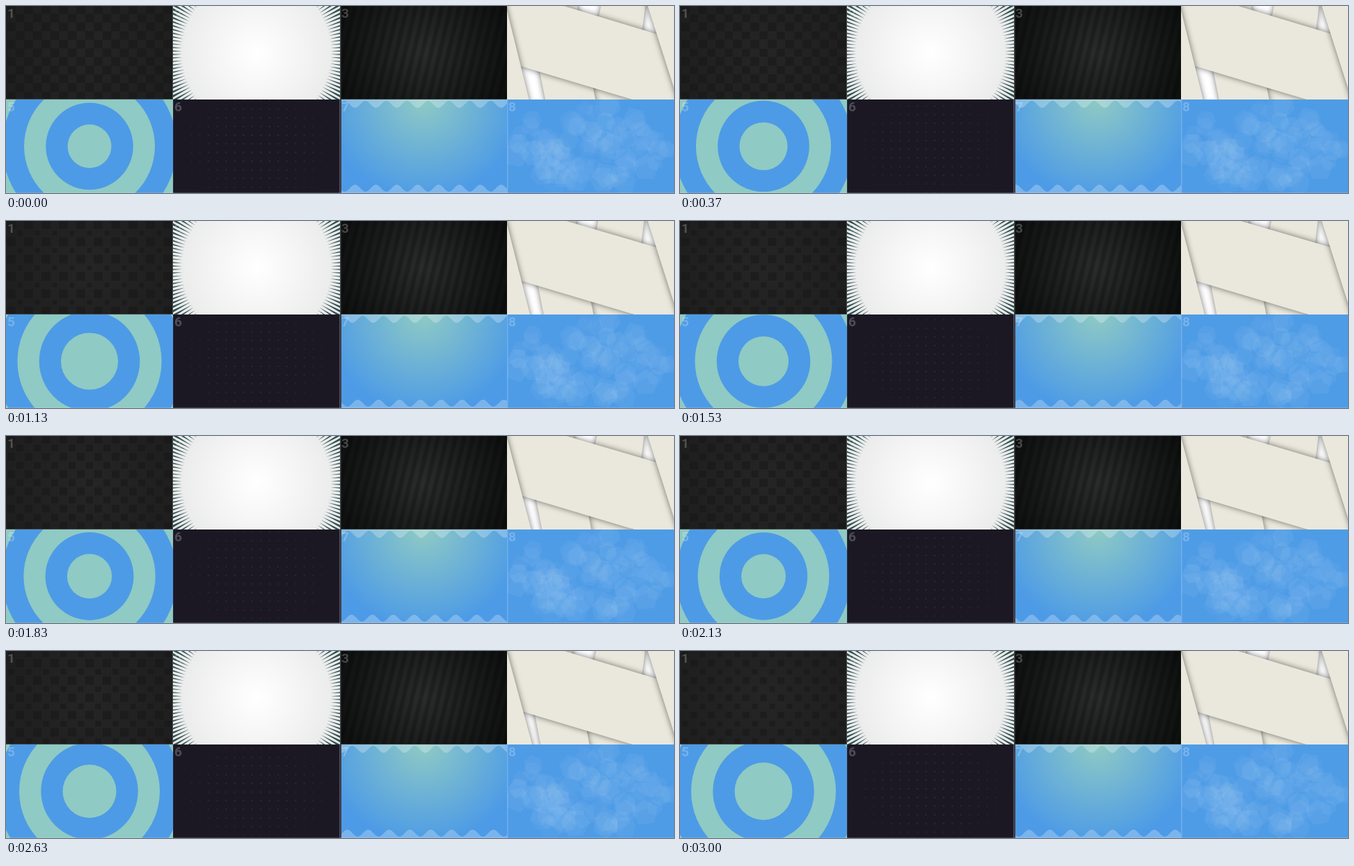
Animation of 960x270 px, one loop 3.03 s. Source, as an HTML page with a canvas:

```html
<!DOCTYPE html>
<html lang="en">
<head>
<meta charset="utf-8">
<title>Eight backgrounds</title>
<style>
html, body { margin: 0; width: 100%; height: 100%; overflow: hidden; background: #222; }
canvas { display: block; }
</style>
</head>
<body>
<canvas id="stage" width="960" height="270"></canvas>
<script>
const g = document.getElementById('stage').getContext('2d');
const W = 240, H = 135, CX = W / 2, CY = H / 2, TAU = Math.PI * 2, LOOP = 3030;

function rect(color, x = 0, y = 0, w = W, h = H) {
  g.fillStyle = color;
  g.fillRect(x, y, w, h);
}

function radial(x, y, r, ...colors) {
  const grad = g.createRadialGradient(x, y, 0, x, y, r);
  colors.forEach((c, i) => grad.addColorStop(i / (colors.length - 1), c));
  return grad;
}

function poly(color, points) {
  g.fillStyle = color;
  g.beginPath();
  for (const [x, y] of points) g.lineTo(x, y);
  g.closePath();
  g.fill();
}

function disc(color, x, y, r) {
  g.fillStyle = color;
  g.beginPath();
  g.arc(x, y, r, 0, TAU);
  g.fill();
}

// 0 at the start of a period, 1 in its middle
const swing = (t, period) => (1 - Math.cos(TAU * t / period)) / 2;

function checker(t) {
  rect(radial(CX, CY, 138, '#252525', '#1e1e1e'));
  const cell = 12.5;
  const even = cell - 6 * swing(t, 2.4);
  const odd = cell - 5 * swing(t, 6) ** 3;
  for (let row = -6; row <= 6; row++) {
    for (let col = -10; col <= 10; col++) {
      if ((row + col) & 1) continue;
      const s = row & 1 ? odd : even;
      rect('rgba(22,22,22,.5)', CX + col * cell - s / 2, CY + row * cell - s / 2, s, s);
    }
  }
  rect('#484848', W - 1, 0, 1, H);
  rect('#484848', 0, H - 1, W, 1);
}

function rays() {
  rect('#2f4f4f');
  const count = 150, points = [];
  for (let i = 0; i < count * 2; i++) {
    const a = i * Math.PI / count, r = i & 1 ? 107 : 175;
    points.push([CX + r * Math.cos(a), CY + r * Math.sin(a)]);
  }
  poly(radial(CX, CY, 140, '#fff', '#f3f3f3', '#e5e6e6'), points);
}

function stripes(t) {
  rect(radial(CX, CY, 132, '#2a2b2b', '#1c1d1d', '#0d100f'));
  const pitch = 12.5;
  for (let x = -pitch / 2 + t * 4 % pitch; x < W + 40; x += pitch) {
    poly('rgba(0,0,0,.22)', [[x, 0], [x + 6, 0], [x - 26, H], [x - 32, H]]);
  }
  rect('#454545', 0, 0, 1.5, H);
  rect('#383838', 0, H - 1, W, 1);
}

function papers(t) {
  rect('#fff');
  const s = swing(t, 6), w = swing(t, 3), cream = '#eae8dc';
  g.shadowColor = 'rgba(0,0,0,.55)';
  g.shadowBlur = 9;
  const left = 137 - 7 * Math.sqrt(s), right = 200 - 2 * w;
  poly(cream, [[left, -10], [right, -10], [right - 20, 145], [left - 31, 145]]);
  poly(cream, [[26 - 6 * s, -10], [99 - 8 * s, -10], [129 - 9 * s, 145], [57 - 7 * s, 145]]);
  // The wide band slides under the two side sheets.
  poly(cream, [[-40, -37], [260, 54 - 3 * w], [260, 159 - w], [-40, 69 - w]]);
  poly(cream, [[-20, -10], [-4 + s, -10], [34 + 5 * s, 145], [-20, 145]]);
  poly(cream, [[196, -20], [260, -20], [260, 150], [250, 150]]);
  g.shadowColor = 'transparent';
}

function rings(t) {
  const blue = '#4d9be6', green = '#8fcac4', inner = 31.5 + 10 * swing(t, 2);
  rect(green);
  for (let i = 3; i >= 0; i--) disc(i & 1 ? blue : green, CX, CY, inner + 31.25 * i);
}

function dots(t) {
  rect('#1b1824');
  const pitch = 12.5;
  for (let y = 14 - pitch * (t % 1) - pitch; y < H + pitch; y += pitch) {
    for (let x = 1.25; x < W; x += pitch) {
      const d = Math.hypot((x - CX) / 118, (y - CY) / 92);
      const alpha = Math.max(0, 1 - d ** 3);
      disc(`rgba(62,60,78,${alpha * 0.5})`, x, y, 1.2);
    }
  }
  rect('#2c2935', 0, 0, 1, H);
  rect('#504e58', W - 1, 0, 1, H);
}

function waves(t) {
  rect(radial(CX, 0, 142, '#8fcac4', '#4d9be6'));
  const color = 'rgba(255,255,255,.25)', length = 30;
  const edge = (shift, place) => {
    const points = [[W, place(0)], [0, place(0)]];
    for (let x = 0; x <= W; x++) {
      points.push([x, place(7 + 5 * Math.cos(TAU * (x - 21.6 + shift) / length))]);
    }
    poly(color, points);
  };
  edge(length * t, y => y);
  edge(-length * t, y => H - y);
  rect('#3c3b46', 0, 0, 2, H);
}

let seed = 11;
function random() {
  seed = seed * 16807 % 2147483647;
  return seed / 2147483647;
}

const shards = Array.from({ length: 90 }, () => {
  const a = random() * TAU, d = random() ** 0.55;
  return {
    x: 120 + 112 * d * Math.cos(a),
    y: 67 + 60 * d * Math.sin(a),
    r: 11 + 10 * random(),
    sides: random() < 0.5 ? 5 : 6,
    angle: random() * TAU,
    spin: (random() - 0.5) * 0.4,
    alpha: 0.02 + 0.035 * random()
  };
});

function crystals(t) {
  rect('#4f9ce6');
  for (const { x, y, r, sides, angle, spin, alpha } of shards) {
    const points = Array.from({ length: sides }, (_, i) => {
      const a = angle + spin * t + i * TAU / sides;
      return [x + spin * 8 * t + r * Math.cos(a), y + r * Math.sin(a)];
    });
    poly(`rgba(255,255,255,${alpha})`, points);
  }
  rect('rgba(255,255,255,.2)', 0, 0, 1.5, H);
}

const tiles = [checker, rays, stripes, papers, rings, dots, waves, crystals];

function draw() {
  const t = performance.now() % LOOP / 1000;
  tiles.forEach((paint, i) => {
    g.save();
    g.translate(i % 4 * W, i < 4 ? 0 : H);
    g.beginPath();
    g.rect(0, 0, W, H);
    g.clip();
    paint(t);
    if (i > 3) rect('rgba(255,255,255,.15)', 0, H - 1, W, 1);
    if (paint !== papers) {
      g.fillStyle = 'rgba(255,255,255,.23)';
      g.font = 'bold 19px Roboto, sans-serif';
      g.fillText(i + 1, 2, 17);
    }
    g.restore();
  });
  requestAnimationFrame(draw);
}
draw();
</script>
</body>
</html>
```
